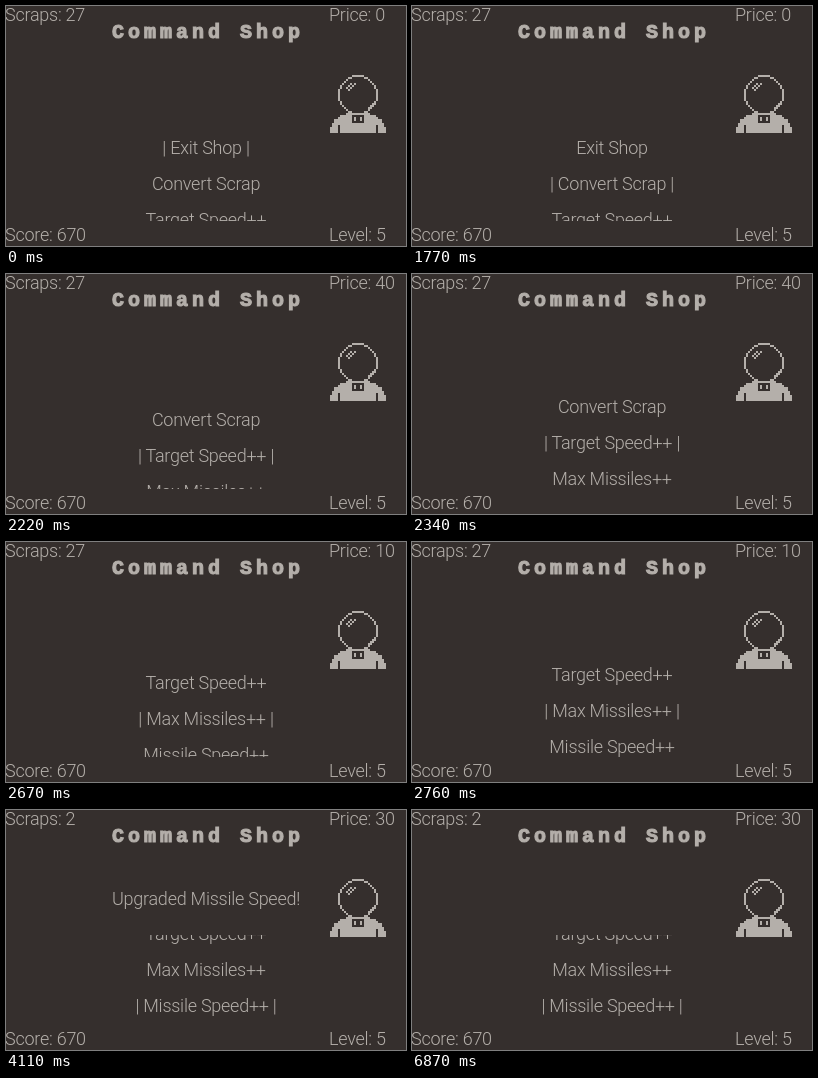
An HTML page for the animation above (7.62 s loop, 400x240 px).

```html
<!DOCTYPE html>
<html lang="en">
<head>
<meta charset="utf-8">
<title>Command Shop</title>
<style>
  html, body { margin: 0; width: 100%; height: 100%; overflow: hidden; background: #352f2d; }
  svg { display: block; width: 400px; height: 240px; }
  text { font: 300 18px Roboto, "Open Sans", sans-serif; letter-spacing: -.25px; fill: #b4afaa; white-space: pre; }
  .title { font: 700 20px "Liberation Mono", monospace; letter-spacing: 4px; stroke: #b4afaa; stroke-width: 1.1px; }
  .mid { text-anchor: middle; }
  .light { fill: #b4afaa; }
  .dark { fill: #352f2d; }
</style>
</head>
<body>
<svg viewBox="0 0 400 240">
  <defs><clipPath id="window"><rect x="100" y="125" width="200" height="90"/></clipPath></defs>
  <rect class="dark" width="400" height="240"/>

  <text id="scraps" x="-1" y="15"></text>
  <text id="price" x="323" y="15"></text>
  <text x="-1" y="235">Score: 670</text>
  <text x="323" y="235">Level: 5</text>
  <text class="title" x="106" y="31.5">Command Shop</text>
  <text id="message" class="mid" x="200" y="95">Upgraded Missile Speed!</text>

  <g clip-path="url(#window)"><g id="list"></g></g>

  <g transform="translate(324 69) scale(2)" shape-rendering="crispEdges">
    <path id="helmet" class="light"/>
    <!-- glass reflections -->
    <path class="light" d="M10 4h1v1h-1v1h-1v1h-1v-1h1v-1h1zM12 4h1v1h-1v1h-1v1h-1v1h-1v-1h1v-1h1v-1h1z"/>
    <path class="light" d="M21 14h1v1h-1v1h-1v1h-1v-1h1v-1h1z"/>
    <!-- suit -->
    <path class="light" d="M8 19h12v1h3v1h1v1h2v2h1v2h1v3H0v-3h1v-2h1v-2h2v-1h1v-1h3z"/>
    <path class="dark" d="M11 20h6v4h-6zM4 25h1v4h-1zM23 25h1v4h-1z"/>
    <path class="light" d="M12 21h1v2h-1zM15 21h1v2h-1z"/>
  </g>
</svg>
<script>
  const LOOP = 7620, TICK = 30, ROW = 36, MAX_SCROLL = 90;
  const BUY = 4110, MESSAGE_END = 6870;
  const items = [
    ["Exit Shop", 0], ["Convert Scrap", 0], ["Target Speed++", 40],
    ["Max Missiles++", 10], ["Missile Speed++", 25]
  ];
  // Each move selects the next row and scrolls toward it.
  const moves = [
    { at: 1770, from: 0, to: 9, ticks: 4 },
    { at: 2130, from: 9, to: 45, ticks: 7.5 },
    { at: 2550, from: 45, to: 81, ticks: 7.5 },
    { at: 3000, from: 81, to: 117, ticks: 7.5 }
  ];
  const get = id => document.getElementById(id);
  const list = get("list");

  const rows = items.map((item, i) => {
    const row = document.createElementNS("http://www.w3.org/2000/svg", "text");
    row.setAttribute("class", "mid");
    row.setAttribute("x", 200);
    row.setAttribute("y", 148 + i * ROW);
    return list.appendChild(row);
  });

  function ringPath(size, inner, outer) {
    let d = "";
    const c = (size - 1) / 2;
    for (let y = 0; y < size; y++)
      for (let x = 0; x < size; x++) {
        const r = Math.hypot(x - c, y - c);
        if (r >= inner && r < outer) d += `M${x + 4} ${y}h1v1h-1z`;
      }
    return d;
  }
  get("helmet").setAttribute("d", ringPath(20, 9, 9.85));

  function setText(node, value) {
    if (node.textContent !== value) node.textContent = value;
  }

  function scrollAt(t, move) {
    if (!move) return 0;
    const p = Math.min(1, Math.floor((t - move.at) / TICK) / move.ticks);
    const eased = 1 - (1 - p) ** 2;
    return Math.min(MAX_SCROLL, Math.round(move.from + (move.to - move.from) * eased));
  }

  function draw() {
    const t = performance.now() % LOOP;
    const selected = moves.filter(m => t >= m.at).length;
    const bought = t >= BUY;

    rows.forEach((row, i) => {
      const name = items[i][0];
      setText(row, i === selected ? `| ${name} |` : name);
    });
    list.setAttribute("transform", `translate(0 ${-scrollAt(t, moves[selected - 1])})`);
    setText(get("scraps"), `Scraps: ${bought ? 2 : 27}`);
    setText(get("price"), `Price: ${bought ? 30 : items[selected][1]}`);
    get("message").style.visibility = bought && t < MESSAGE_END ? "visible" : "hidden";
    requestAnimationFrame(draw);
  }
  draw();
</script>
</body>
</html>
```
